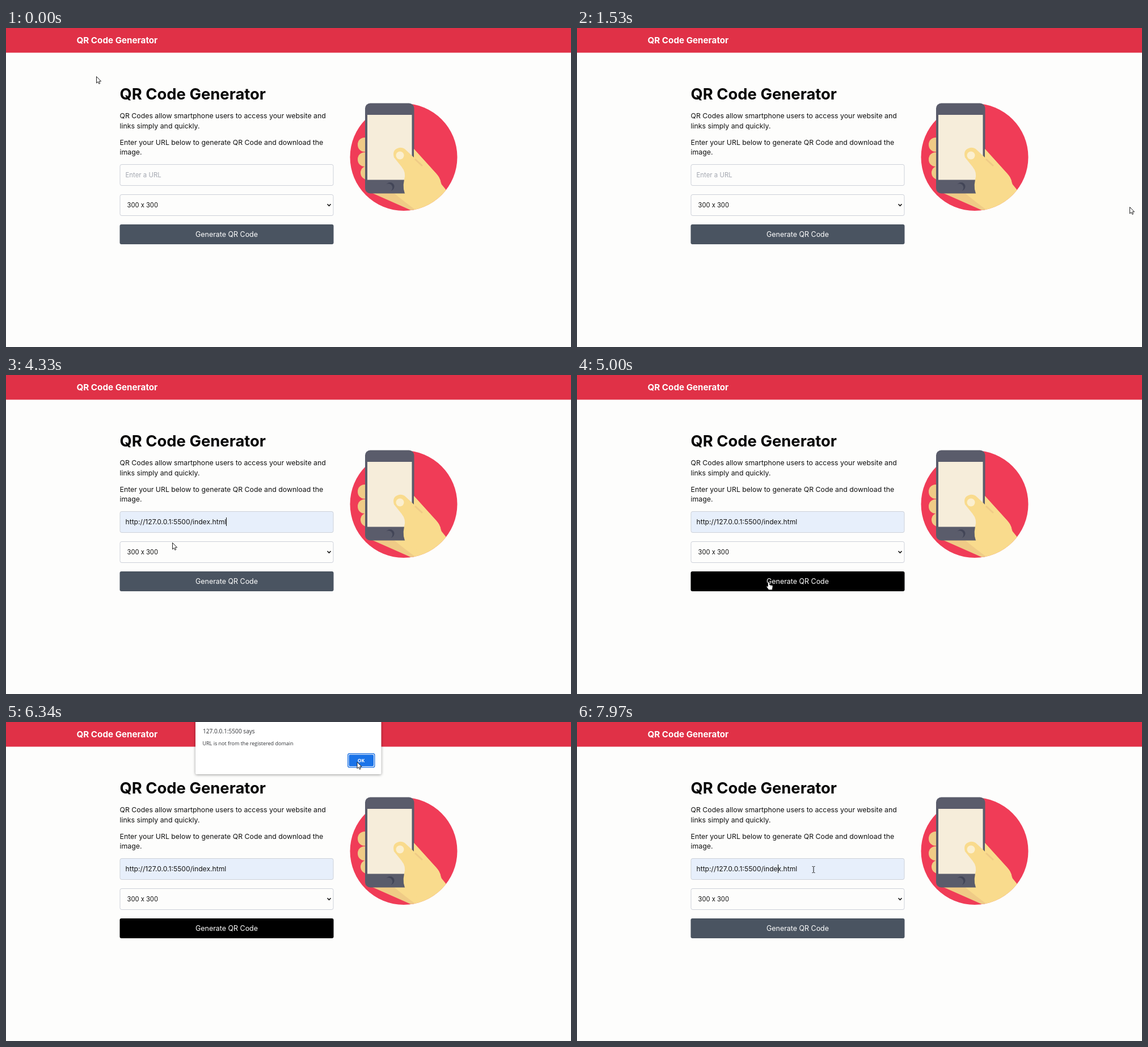
An HTML page with a canvas that plays this animation: 996 px wide and 562 px high, repeating every 8 s.

```html
<!DOCTYPE html>
<html lang="en">
<head>
<meta charset="utf-8">
<title>QR Code Generator</title>
<style>
html, body { margin: 0; width: 100%; height: 100%; overflow: hidden; background: #fdfdfc; }
canvas { display: block; }
</style>
</head>
<body>
<canvas id="stage" width="996" height="562"></canvas>
<script>
const view = document.getElementById('stage').getContext('2d');
// The dialog is composed on its own layer so that it fades as one piece.
const layer = document.createElement('canvas');
layer.width = 996;
layer.height = 110;
const sheet = layer.getContext('2d');
let ctx = view;

const LOOP = 8000;
const SANS = 'Inter, sans-serif';
const DIALOG = '"Open Sans", "Noto Sans", sans-serif';
const FIELD = `12.15px ${SANS}`;
const URL_TEXT = 'http://127.0.0.1:5500/index.html';

// Key times in ms
const T = {
  focus: 3400, fill: 4000, open: 5040, opened: 5170, leave: 5570,
  press: 6400, close: 6865, closed: 7085, refocus: 7500
};

// Pointer stops: time, x, y
const STOPS = [
  [0, 159, 85], [800, 622, 232], [1450, 974, 315], [1670, 974, 315],
  [2500, 430, 288], [3100, 257, 265], [3550, 257, 265], [3950, 288, 294],
  [4330, 293, 295], [4880, 338, 364.5], [T.leave, 338, 364.5], [6300, 618.5, 70],
  [7000, 618.5, 70], [7420, 354, 259], [7600, 354, 259], [7900, 417, 260],
  [8000, 417, 260]
];

const clamp = v => Math.max(0, Math.min(1, v));
const ease = v => v * v * (3 - 2 * v);
const ramp = (t, a, b) => clamp((t - a) / (b - a));
const inside = (p, x, y, w, h) => p.x >= x && p.x <= x + w && p.y >= y && p.y <= y + h;

function text(str, x, y, font, color, align = 'left') {
  ctx.font = font;
  ctx.fillStyle = color;
  ctx.textAlign = align;
  ctx.fillText(str, x, y);
}

function box(x, y, w, h, r, fill, line) {
  ctx.beginPath();
  ctx.roundRect(x, y, w, h, r);
  ctx.fillStyle = fill;
  ctx.fill();
  if (line) {
    ctx.strokeStyle = line;
    ctx.lineWidth = 1;
    ctx.stroke();
  }
}

function disc(x, y, r, fill) {
  ctx.beginPath();
  ctx.arc(x, y, r, 0, Math.PI * 2);
  ctx.fillStyle = fill;
  ctx.fill();
}

function shape(d, fill, line, width = 1) {
  const path = new Path2D(d);
  if (fill) {
    ctx.fillStyle = fill;
    ctx.fill(path);
  }
  if (line) {
    ctx.strokeStyle = line;
    ctx.lineWidth = width;
    ctx.stroke(path);
  }
}

function pointerAt(t) {
  let i = 0;
  while (i < STOPS.length - 2 && t >= STOPS[i + 1][0]) i++;
  const [ta, xa, ya] = STOPS[i], [tb, xb, yb] = STOPS[i + 1];
  const k = ease(ramp(t, ta, tb));
  return { x: xa + (xb - xa) * k, y: ya + (yb - ya) * k };
}

function drawPage() {
  ctx.fillStyle = '#fdfdfc';
  ctx.fillRect(0, 0, 996, 562);
  ctx.fillStyle = '#e03147';
  ctx.fillRect(0, 0, 996, 43.5);
  text('QR Code Generator', 124.5, 27, `700 15.2px ${SANS}`, '#fff');
  text('QR Code Generator', 200.5, 126, `700 27.4px ${SANS}`, '#050505');
  const lines = [
    ['QR Codes allow smartphone users to access your website and', 159],
    ['links simply and quickly.', 176.5],
    ['Enter your URL below to generate QR Code and download the', 206],
    ['image.', 223]
  ];
  for (const [str, y] of lines) text(str, 200.5, y, `12.32px ${SANS}`, '#111');
}

function drawForm(t, hover) {
  const filled = t >= T.fill;
  box(201, 240.5, 376, 37, 3, filled ? '#e7effb' : '#fdfdfc', '#cdd1d9');
  if (filled) text(URL_TEXT, 210.5, 263, FIELD, '#161616');
  else text('Enter a URL', 210.5, 263, `11.4px ${SANS}`, '#a3a7b0');
  drawCaret(t);

  box(201, 293.5, 376, 37, 3, '#fdfdfc', '#cdd1d9');
  text('300 x 300', 213.5, 316, `11.2px ${SANS}`, '#111');
  shape('M566.5 310.3l3 3l3-3', null, '#111', 1.6);

  box(200.5, 346, 377, 35, 3, hover ? '#000' : '#4a5461');
  text('Generate QR Code', 389, 367.5, `12.45px ${SANS}`, '#fff', 'center');
}

function drawCaret(t) {
  let since, before;
  if (t >= T.refocus) [since, before] = [T.refocus, URL_TEXT.slice(0, -6)];
  else if (t >= T.fill && t < T.open - 60) [since, before] = [T.fill, URL_TEXT];
  else if (t >= T.focus && t < T.fill) [since, before] = [T.focus, ''];
  else return;
  if ((t - since) % 1000 >= 500) return;
  ctx.font = FIELD;
  ctx.fillStyle = '#111';
  ctx.fillRect(Math.round(210.5 + ctx.measureText(before).width), 251, 1, 15);
}

function drawArt() {
  const skin = '#f9db8d', shade = '#efcb86', dark = '#5a5c6b';
  disc(701, 227.5, 94.5, '#f03c57');

  ctx.save();
  ctx.beginPath();
  ctx.arc(701, 227.5, 94.5, 0, Math.PI * 2);
  ctx.clip();
  box(620, 193, 28, 25, 12, shade);
  box(620, 219, 28, 25, 12, shade);
  box(625, 243, 26, 24, 12, shade);
  shape('M640 270L646 291L716 322L730 324L760 310L776 286L768 281Q768 267 758 256L719 213L700 230Z', shade);
  shape('M684 291Q706 309 724 322L760 312L778 288L765 272L724 255Z', skin);
  ctx.restore();

  box(633, 132.5, 86.5, 159, 9, dark);
  ctx.fillStyle = '#f6edda';
  ctx.fillRect(637, 153, 78.5, 114.5);
  disc(677, 279.5, 7.5, '#424557');
  disc(674, 281.5, 7.3, dark);

  shape('M684 228Q680 214 693 211Q700 210 705 215L719 228L756 258Q767 267 767.5 280Q766 303 741 308Q719 312 706 297Q698 285 702 267Q706 255 697 244Z', skin);
  shape('M719 213L758 256Q764 262 766 270L719 230Z', skin);
  shape('M721 231L734 243', null, shade, 3);
  disc(694.5, 224.5, 7, '#fbefcf');
}

function drawSheet(t, tilt) {
  sheet.clearRect(0, 0, layer.width, layer.height);
  ctx = sheet;
  ctx.save();
  ctx.shadowColor = 'rgba(0,0,0,.4)';
  ctx.shadowBlur = 5;
  ctx.shadowOffsetY = 1;
  shape(`M${334 + tilt} -20H${661.5 - tilt}L${661.5 + tilt} 90Q${661.5 + tilt} 92 ${659.5 + tilt} 92` +
    `H${336 - tilt}Q${334 - tilt} 92 ${334 - tilt} 90Z`, '#fff');
  ctx.restore();

  text('127.0.0.1:5500 says', 347, 20, `10.15px ${DIALOG}`, '#303236');
  text('URL is not from the registered domain', 346.5, 41, `9px ${DIALOG}`, '#303236');
  if (t < T.press) {
    box(602, 55, 48.5, 25.5, 3.5, '#1a6fe0');
    box(603.3, 56.3, 45.9, 22.9, 2.5, '#e9f1fd');
    box(604.5, 57.5, 43.5, 20.5, 2, '#1a73e8');
  } else {
    box(603, 56.5, 47, 23.5, 3, '#1a73e8');
  }
  text('OK', 626, 71, `700 8.6px ${DIALOG}`, '#fff', 'center');
  ctx = view;
}

function drawDialog(t) {
  const fade = t < T.close ? ramp(t, T.open, T.opened) : 1 - ramp(t, T.close, T.closed);
  if (fade <= 0) return;
  const off = 1 - fade;
  drawSheet(t, off * 2.5);
  ctx.globalAlpha = fade;
  ctx.drawImage(layer, 0, -17 * off);
  // Keep the part above the layer's edge covered while it slides.
  ctx.globalAlpha = 1;
}

function pointerKind(p, t, modal) {
  if (modal && t >= T.leave) return 'arrow';
  if (inside(p, 201, 346, 376, 35)) return 'hand';
  const overText = inside(p, 201, 103, 256, 28) || inside(p, 201, 147, 364, 34) || inside(p, 201, 194, 355, 32);
  return overText || inside(p, 201, 241, 376, 36) ? 'beam' : 'arrow';
}

function drawPointer(p, kind) {
  ctx.save();
  ctx.translate(p.x, p.y);
  ctx.lineJoin = 'round';
  if (kind === 'beam') {
    shape('M-2.5 -5.5H-.6M.6 -5.5H2.5M0 -5V5M-2.5 5.5H-.6M.6 5.5H2.5', null, '#222', 1.1);
  } else if (kind === 'hand') {
    shape('M-1.5 1Q0 -1 1.5 1V5L6 6Q7.5 6.5 7 9L6 14H0L-4 8.5Q-4 6.5 -1.5 8Z', '#fff', '#222', .9);
    shape('M3.2 5.4V8M5.2 5.9V8.2', null, '#555', .6);
  } else {
    shape('M.5 .5V12L3.1 9.6L4.9 13.4L6.7 12.6L5 8.9H8.6Z', '#fff', '#222', 1);
  }
  ctx.restore();
}

function render(t) {
  const p = pointerAt(t);
  const modal = t >= T.open && t < T.close;
  const kind = pointerKind(p, t, modal);
  drawPage();
  // The page is frozen while the dialog is open, so the hover stays.
  drawForm(t, modal || kind === 'hand');
  drawArt();
  drawDialog(t);
  drawPointer(p, kind);
}

const start = performance.now();
function tick() {
  render((performance.now() - start) % LOOP);
  requestAnimationFrame(tick);
}
tick();
</script>
</body>
</html>
```
